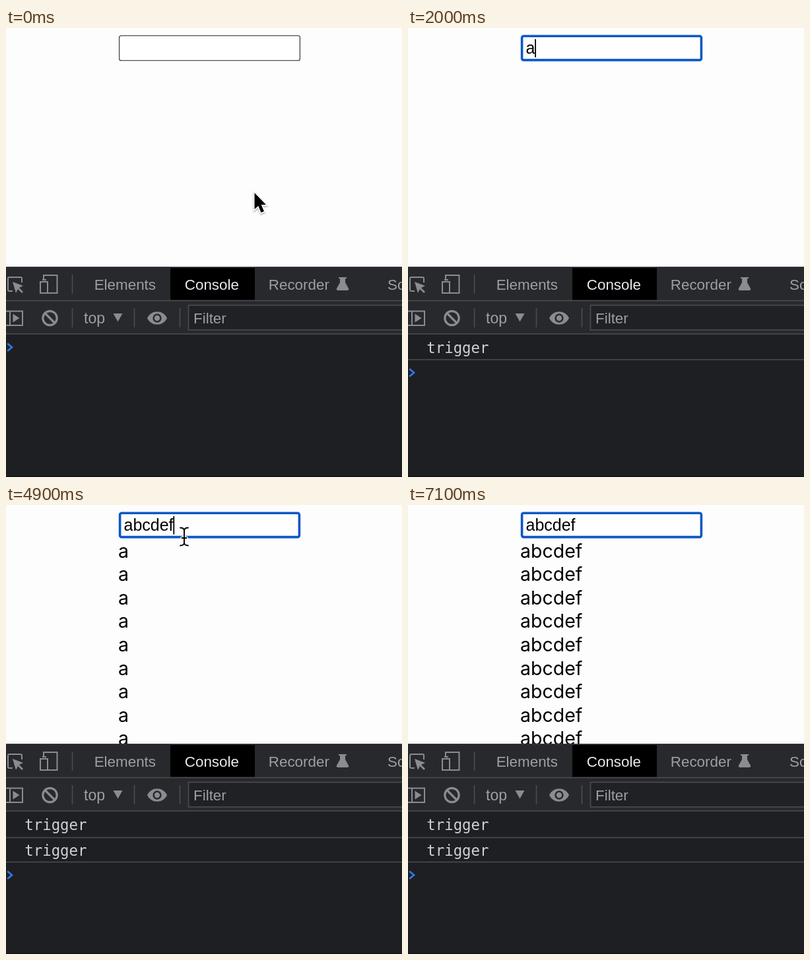
Write an HTML page that moves like this. It is 600 px wide and 681 px high and loops after 7.3 s.

```html
<!DOCTYPE html>
<html lang="en">
<head>
<meta charset="utf-8">
<title>Input lag in the console</title>
<style>
  html, body { margin: 0; width: 100%; height: 100%; overflow: hidden; background: #fefdfe; }
  svg { display: block; width: 600px; height: 681px; }
  text { white-space: pre; }
  .ui { font: 22.4px "Liberation Sans", Arial, sans-serif; fill: #9aa0a6; }
  .field { font: 25px "Liberation Sans", Arial, sans-serif; }
  .list { font: 28.5px Inter, sans-serif; }
  .log { font: 22.4px "DejaVu Sans Mono", monospace; fill: #ccd2d9; }
  .rule { stroke: #4b4d51; stroke-width: 1.6; fill: none; }
  .icon { stroke: #898c90; stroke-width: 2; fill: none; }
  .solid { fill: #898c90; }
</style>
</head>
<body>
<svg viewBox="0 0 600 681">
  <defs>
    <filter id="shadow" x="-50%" y="-50%" width="200%" height="200%">
      <feDropShadow dx="0" dy="1.5" stdDeviation="1.3" flood-opacity=".4"/>
    </filter>
  </defs>

  <!-- page -->
  <rect id="box" fill="#fff"/>
  <text id="typed" class="field" x="178.5" y="38.5"></text>
  <path id="caret" stroke="#000" stroke-width="1.8"/>
  <g id="list" class="list"></g>

  <!-- tab bar -->
  <rect y="362" width="600" height="319" fill="#1e1f22"/>
  <rect y="362" width="600" height="102" fill="#28292c"/>
  <path d="M0 362.5H600" stroke="#3b3c3f"/>
  <rect x="249" y="364" width="128" height="48.5"/>
  <path class="rule" d="M0 413.5H600M0 464H600M100.5 374V403M100.5 425V454M194.5 425V454M263.5 425V454"/>
  <g class="ui">
    <text x="133.7" y="397">Elements</text>
    <text x="270.8" y="397" fill="#e8eaed">Console</text>
    <text x="397.8" y="397">Recorder</text>
    <text x="578" y="397">Sources</text>
    <text x="118" y="447.5" font-size="23" style="font-size:23px">top</text>
  </g>
  <path class="icon" d="M10 399H5Q3 399 3 397V380Q3 378 5 378H22Q24 378 24 380V386"/>
  <path class="solid" d="M10 385L26 391L20 394L26 400L24 402L18 396L15 402Z"/>
  <path class="icon" d="M57 381V375H77.500V402H64M52 385H63V402H52ZM55 382H61"/>
  <path class="solid" d="M504 378H516V380H514V386L519 395Q520 398 517 398H503Q500 398 501 395L506 386V380H504Z"/>

  <!-- console toolbar -->
  <path class="icon" d="M-2 429.500H25V451H-2M6 429V451"/>
  <path class="solid" d="M10.500 433.500L20.500 440L10.500 446.500Z"/>
  <g class="icon" style="stroke-width:3.2"><circle cx="66.500" cy="440" r="10.700"/><path d="M59 432.500L74 447.500"/></g>
  <path class="solid" d="M162.500 433H176.500L169.500 445.500Z"/>
  <path class="solid" d="M214 440C220 427 238 427 244 440C238 453 220 453 214 440Z"/>
  <circle cx="229" cy="440" r="5.400" fill="#898c90" stroke="#28292c" stroke-width="2.500"/>
  <rect class="rule" x="276.500" y="420.500" width="340" height="37.500" style="fill:#202124"/>
  <text class="ui" x="284" y="448">Filter</text>

  <!-- console output -->
  <g id="logs" class="log"></g>
  <path id="prompt" d="M2.200 478.500L9 484.300L2.200 490" fill="none" stroke="#2f7be8" stroke-width="2.600"/>
  <path d="M0 680.500H600" stroke="#0c0c0e"/>

  <!-- pointers -->
  <path id="arrow" d="M0 0V25L5.700 19.800L10 30L14.500 28L10.200 18H17.500Z"
        stroke="#fff" stroke-width="3" paint-order="stroke" filter="url(#shadow)"/>
  <g id="beam" fill="none" stroke-linecap="round">
    <path id="beamEdge" stroke="#fff" stroke-width="4.500"/>
    <path id="beamLine" stroke="#000" stroke-width="1.900"/>
  </g>
</svg>
<script>
const LOOP = 7300, TICK = 100;
const $ = id => document.getElementById(id);
const set = (el, attrs) => { for (const k in attrs) el.setAttribute(k, attrs[k]); };
const show = (el, on) => el.style.display = on ? '' : 'none';
const within = (t, a, b) => t >= a && t < b;

const make = (parent, tag, attrs) => {
  const el = document.createElementNS('http://www.w3.org/2000/svg', tag);
  set(el, attrs);
  return parent.appendChild(el);
};

const beamShape = 'M-6-13.5C-2-13.5 0-12 0-9V9C0 12-2 13.5-6 13.5' +
  'M6-13.5C2-13.5 0-12 0-9M0 9C0 12 2 13.5 6 13.5M-3.5 2H3.5';
set($('beamEdge'), { d: beamShape });
set($('beamLine'), { d: beamShape });

const items = Array.from({ length: 9 }, (_, i) =>
  make($('list'), 'text', { x: 170, y: 79.5 + 35.6 * i }));

const logs = [0, 1].map(i => {
  const row = make($('logs'), 'g', {});
  make(row, 'text', { x: 28.2, y: 493 + 38.5 * i }).textContent = 'trigger';
  const line = make(row, 'path', { class: 'rule' });
  return { row, line };
});

// Position along [time, x, y] keys, eased between neighbours
function along(keys, t) {
  const i = keys.findIndex(k => k[0] > t);
  if (i === 0) return keys[0].slice(1);
  if (i < 0) return keys[keys.length - 1].slice(1);
  const [t0, x0, y0] = keys[i - 1], [t1, x1, y1] = keys[i];
  const p = (t - t0) / (t1 - t0), e = p * p * (3 - 2 * p);
  return [x0 + (x1 - x0) * e, y0 + (y1 - y0) * e];
}

const arrowPath = [[200, 376.5, 250], [700, 258, 36.5]];
const beamPath = [[1400, 268, 52], [4400, 436, 35], [4800, 262, 54], [4900, 270, 48],
                  [5300, 270, 48], [5500, 270, 52]];
const caretTimes = [[800, 1300], [1600, 5200], [5400, 5900], [6400, 6900]];

function place(el, on, path, t) {
  show(el, on);
  set(el, { transform: `translate(${along(path, t)})` });
}

function draw(t) {
  const focused = t >= 800;
  set($('box'), focused
    ? { x: 172.6, y: 12.2, width: 271.8, height: 36.4, rx: 2.5, stroke: '#0b57c4', 'stroke-width': 3.6 }
    : { x: 171.6, y: 11.6, width: 273.8, height: 37.8, rx: 3, stroke: '#4d4e52', 'stroke-width': 1.4 });

  const value = t < 1600 ? '' : t < 3400 ? 'a' : t < 3500 ? 'abcde' : 'abcdef';
  $('typed').textContent = value;
  const end = 179.2 + (value ? $('typed').getComputedTextLength() : 0);
  set($('caret'), { d: `M${end} 17V44.5` });
  show($('caret'), caretTimes.some(([a, b]) => within(t, a, b)));

  const result = t < 3400 ? '' : t < 5200 ? 'a' : 'abcdef';
  items.forEach(item => item.textContent = result);

  const count = t < 1800 ? 0 : t < 3800 ? 1 : 2;
  logs.forEach(({ row, line }, i) => {
    show(row, i < count);
    const y = i ? 541.5 : count > 1 ? 504.5 : 503;
    set(line, { d: `M0 ${y}H600` });
  });
  set($('prompt'), { transform: `translate(0 ${38.5 * count})` });

  place($('arrow'), t < 1200, arrowPath, t);
  place($('beam'), within(t, 1200, 1600) || within(t, 4400, 6400), beamPath, t);
}

const start = performance.now();
function frame() {
  const t = Math.max(0, performance.now() - start) % LOOP;
  draw(Math.floor(t / TICK) * TICK);
  requestAnimationFrame(frame);
}
frame();
</script>
</body>
</html>
```
